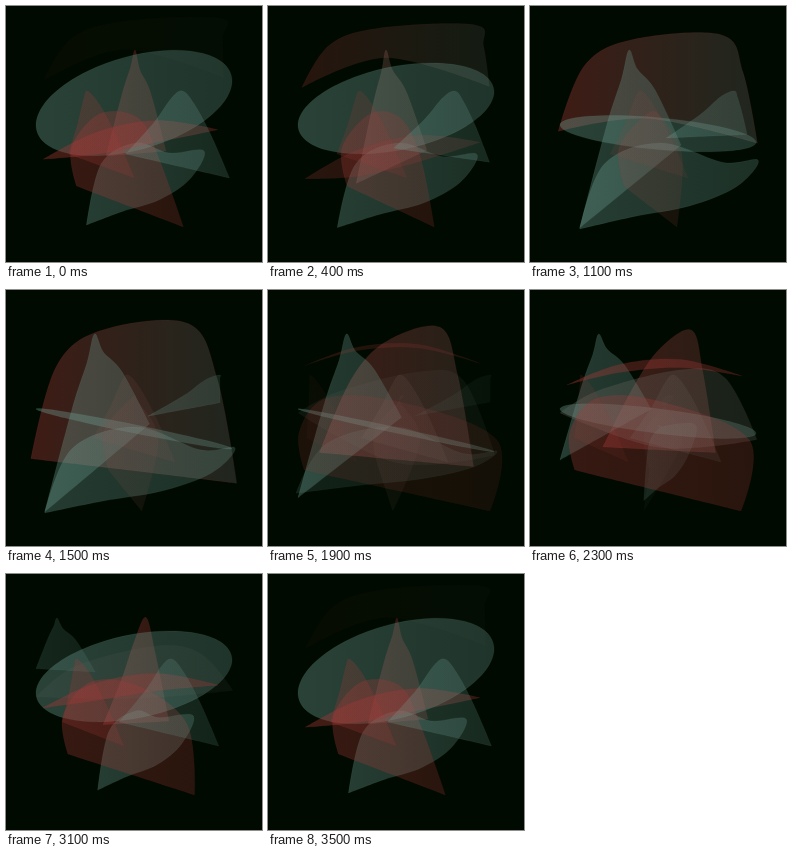
Recreate the animation shown at these times as an HTML page with a canvas. Size 256 by 256 pixels, loop 3.6 s.

```html
<!DOCTYPE html>
<html lang="en">
<head>
<meta charset="utf-8">
<title>Turning translucent sheets</title>
<style>
  html, body { margin: 0; width: 100%; height: 100%; overflow: hidden; background: #000a00; }
  canvas { display: block; width: 256px; height: 256px; }
</style>
</head>
<body>
<canvas id="stage" width="256" height="256"></canvas>
<script>
const ctx = document.getElementById("stage").getContext("2d");
const STEP = 100, STEPS = 36, TURN = 3500;
const CX = 129;
const RED = [165, 56, 54], CYAN = [115, 165, 155], GREY = [112, 108, 104];

const clamp = v => Math.min(1, Math.max(0, v));
const mix = (a, b, u) => a + (b - a) * u;
const mixAll = (a, b, u) => a.map((v, i) => mix(v, b[i], u));
const ramp = (v, a, b) => clamp((v - a) / (b - a));
const fade = (v, a, b, c, d) => ramp(v, a, b) * (1 - ramp(v, c, d));
// A point between a and b with its own share for each axis.
const between = (a, b, u, v) => [mix(a[0], b[0], u), mix(a[1], b[1], v)];
// A point on the turning rim; positive angles lie to the left.
const rim = (deg, y, bulge) =>
  [CX - (92 + bulge * (deg / 60) ** 2) * Math.sin(deg * Math.PI / 180), y];

// The body repeats every 60 degrees, and each turn advances it by one repeat.
// `age` counts the turns since a sheet appeared.

function dome(age) {
  const early = Math.min(age, 0.43);
  const u = 1 - (1 - ramp(age, 0.43, 1)) ** 2;
  const apex = rim(60 * (age - 1), 44 - 32 * (1 - age) ** 2, 7);
  const left = mixAll([37 - 28 * early, 75 + 510 * early ** 2], [100, 150], u);
  const right = mixAll([218 + 30 * early, 72 + 660 * early ** 2], [160, 145], u);
  const low = mixAll(left, right, 0.45);
  low[1] -= 30 * (1 - (early / 0.43) ** 3);
  return {
    points: [
      left,
      between(left, apex, mix(0.16, 0.45, u), mix(0.68, 0.42, u)),
      between(left, apex, mix(0.45, 0.75, u), mix(0.95, 0.78, u)),
      apex,
      between(apex, right, mix(0.6, 0.4, u), 0.35),
      right, low
    ],
    corners: [0, 5],
    tint: RED, tintRight: mixAll(GREY, RED, u),
    alpha: mix(0.04, 0.38, ramp(age, 0, 0.2))
  };
}

function panel(age) {
  const p = age - 1;
  const apex = rim(60 * p, 44, 7);
  const deg = 30 + 60 * p;
  const tip = rim(deg, 222 - 5.5 * Math.max(0, deg - 60), 20);
  tip[0] = Math.max(30, tip[0]);
  const left = mixAll([100, 150], tip, ramp(p, 0, 0.3));
  const right = [160 - 90 * p * p, 145 - 60 * p * p];
  return {
    points: [
      apex,
      between(apex, right, 0.16, 0.2), between(apex, right, 0.5, 0.42),
      right, left,
      between(apex, left, 0.45, 0.42), between(apex, left, 0.15, 0.16)
    ],
    corners: [3, 4],
    tint: mixAll(RED, CYAN, ramp(p, 0, 0.3)),
    alpha: 0.33 * (1 - 0.75 * ramp(p, 0.72, 1))
  };
}

function wing(age) {
  const deg = 60 * age - 30;
  const tip = rim(deg, 223 - 3 * Math.max(0, deg - 56) - 0.4 * Math.max(0, 40 - deg), 20);
  const hook = [Math.min(229, 150 + 1.6 * deg), 130 + 0.5 * deg];
  const inner = [hook[0] - 35, hook[1] + 2];
  return {
    points: [
      tip,
      between(tip, hook, 0.3, 0.18), between(tip, hook, 0.62, 0.34),
      between(tip, hook, 0.88, 0.62),
      hook, inner, [130, 137], between(tip, [130, 137], 0.3, 0.75)
    ],
    corners: [0],
    tint: CYAN, alpha: 0.33 * fade(age, 0.55, 0.75, 1.42, 1.65)
  };
}

function skirt(age) {
  const tip = rim(60 * age - 90, 221, 20);
  const x = 28 + 75 * (age - 0.5);
  const corner = [x + 5, 180];
  return {
    points: [
      [x, 142], corner, mixAll(corner, tip, 0.5), tip,
      [mix(232, 152, ramp(age, 0.43, 1) ** 2), 150], [132, 112], [x + 28, 108]
    ],
    corners: [1, 3],
    tint: mixAll(RED, GREY, ramp(age, 1.2, 1.7)),
    alpha: 0.33 * fade(age, 0.43, 0.65, 1, 1.8)
  };
}

function ribbon(age) {
  const d = age - 0.657;
  const left = [37, 95 + 170 * d], right = [212, 86 + 110 * d];
  const arc = (u, drop) => {
    const [x, y] = mixAll(left, right, u);
    return [x, y - 22 * Math.sin(Math.PI * u) + drop];
  };
  const thick = 8 + 40 * d;
  return {
    points: [left, arc(0.3, 0), arc(0.65, 0), right, arc(0.65, thick), arc(0.3, thick)],
    corners: [0, 3],
    tint: RED, alpha: 0.4 * fade(age, 0.45, 0.62, 1, 1.3)
  };
}

function farPeak(age) {
  const deg = 60 * age - 90;
  const apex = rim(-deg, 85, 12);
  const shrink = ramp(deg, 30, 56);
  const left = [mix(CX, apex[0], 0.6) - 38, mix(148, 126, shrink)];
  const right = [apex[0] + 47 * (1 - shrink), mix(172, 112, shrink)];
  return {
    points: [
      apex,
      between(apex, right, 0.25, 0.15), between(apex, right, 0.6, 0.5),
      right, left,
      between(apex, left, 0.5, 0.5), between(apex, left, 0.2, 0.12)
    ],
    corners: [3, 4],
    tint: mixAll(RED, CYAN, ramp(deg, -15, 20)),
    alpha: 0.27 * fade(age, 0.45, 0.9, 2.4, 2.6) * (1 - 0.5 * fade(age, 1, 1.2, 1.7, 2))
  };
}

function ring(p) {
  const rightY = 119 - 44 * Math.cos(2 * Math.PI * p);
  const height = 2 + 46 * Math.cos(Math.PI * p) ** 2;
  const points = Array.from({ length: 16 }, (_, i) => {
    const a = i * Math.PI / 8;
    return [128 + 98 * Math.cos(a),
            mix(119, rightY, (1 + Math.cos(a)) / 2) - height * Math.sin(a)];
  });
  return { points, corners: [], tint: CYAN, alpha: 0.36 };
}

function cap(age) {
  const left = [30, 123], right = [227, mix(165, 100, ramp(age, 0.55, 1))];
  const top = mix(82, 68, ramp(age, 0.6, 1));
  return {
    points: [left, [70, top + 20], [150, top], [195, top + 8], right, [130, right[1] + 8]],
    corners: [0, 4],
    tint: GREY, alpha: 0.34 * Math.sin(Math.PI * ramp(age, 0.43, 1)) ** 2
  };
}

// Each sheet with the ages between which it exists.
const sheets = [
  [dome, 0, 1], [panel, 1, 2], [ring, 0, 1], [cap, 0.43, 1],
  [wing, 0.55, 1.65], [skirt, 0.43, 1.8], [ribbon, 0.45, 1.3], [farPeak, 0.45, 2.6]
];

// Smooth closed outline that keeps the listed corners sharp.
function outline(points, corners) {
  const n = points.length;
  const at = i => points[(i + n) % n];
  const handle = (i, axis) =>
    corners.includes(i % n) ? 0 : (at(i + 1)[axis] - at(i - 1)[axis]) / 6;
  const path = new Path2D();
  path.moveTo(...points[0]);
  for (let i = 0; i < n; i++) {
    const [x0, y0] = at(i), [x1, y1] = at(i + 1);
    path.bezierCurveTo(
      x0 + handle(i, 0), y0 + handle(i, 1),
      x1 - handle(i + 1, 0), y1 - handle(i + 1, 1), x1, y1);
  }
  path.closePath();
  return path;
}

function drawSheet({ points, corners, tint, tintRight = tint, alpha }) {
  const xs = points.map(p => p[0]);
  const rgba = (c, a) => `rgba(${c.map(Math.round).join()},${a})`;
  const shade = ctx.createLinearGradient(Math.min(...xs), 0, Math.max(...xs), 0);
  shade.addColorStop(0, rgba(tint, alpha));
  shade.addColorStop(1, rgba(tintRight, alpha * 0.75));
  const path = outline(points, corners);
  ctx.fillStyle = shade;
  ctx.fill(path);
  ctx.strokeStyle = rgba(tint, alpha * 0.25);
  ctx.stroke(path);
}

function draw(now) {
  const step = Math.floor(now / STEP) % STEPS;
  const phase = step * STEP % TURN / TURN;
  ctx.fillStyle = "#000a00";
  ctx.fillRect(0, 0, 256, 256);
  for (const [sheet, born, gone] of sheets) {
    for (let age = phase; age < gone; age++) {
      if (age >= born) drawSheet(sheet(age));
    }
  }
  requestAnimationFrame(() => draw(performance.now() - began));
}

const began = performance.now();
draw(0);
</script>
</body>
</html>
```
